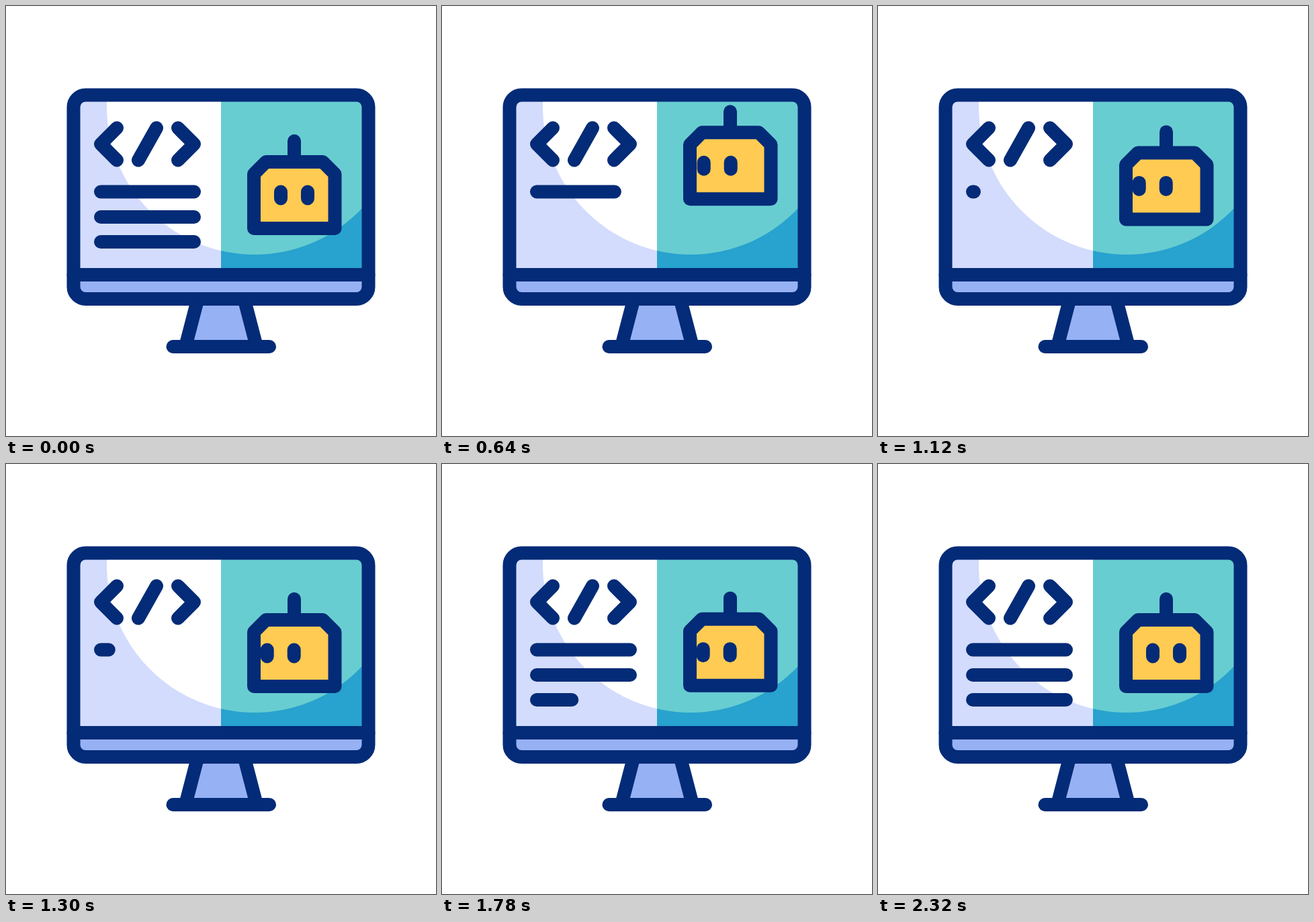
Write an HTML page that moves like this. It is 640 px wide and 640 px high and loops after 2.4 s.

```html
<!DOCTYPE html>
<html lang="en">
<head>
<meta charset="utf-8">
<title>Coding robot</title>
<style>
  html, body { margin: 0; width: 100%; height: 100%; overflow: hidden; background: #fff; }
  svg { display: block; width: 100%; height: 100%; }
  .ink { fill: none; stroke: #032b77; stroke-width: 20; stroke-linecap: round; stroke-linejoin: round; }
</style>
</head>
<body>
<svg viewBox="0 0 640 640">
  <clipPath id="disc"><circle cx="370" cy="150" r="220"/></clipPath>

  <path class="ink" style="fill:#96b1f4" d="M285.5 436 267 507H373L354.5 436"/>
  <path class="ink" d="M248.5 507H392"/>

  <path fill="#d3dcfd" d="M100 132H320V400H100z"/>
  <path fill="#28a2ce" d="M320 132H540V400H320z"/>
  <g clip-path="url(#disc)">
    <path fill="#fff" d="M100 132H320V400H100z"/>
    <path fill="#68cdd1" d="M320 132H540V400H320z"/>
  </g>
  <path fill="#96b1f4" d="M100 400H540V418a18 18 0 0 1-18 18H118a18 18 0 0 1-18-18z"/>
  <rect class="ink" x="100.5" y="132.5" width="439" height="303.5" rx="18"/>
  <path class="ink" d="M100.5 400H539.5"/>

  <path class="ink" d="M165 181.5 141 205.5 165 229.5M224 181.5 197 229.5M256 181.5 280 205.5 256 229.5"/>
  <g id="lines" class="ink"><path/><path/><path/></g>

  <g id="robot" class="ink">
    <path d="M429 201V232"/>
    <path fill="#ffcb52" d="M369 331V250L387 232H471.5L489.5 250V331z"/>
    <path id="eyes" d="M409 276.5V286.5M449 276.5V286.5"/>
  </g>
</svg>
<script>
const LOOP = 2400, LEFT = 141, LENGTH = 139;
const lineY = [276.5, 314, 351];
const [robot, eyes] = ['robot', 'eyes'].map(id => document.getElementById(id));
const lines = [...document.querySelectorAll('#lines path')];

const clamp = x => Math.min(1, Math.max(0, x));
const span = (t, from, to) => clamp((t - from) / (to - from));
const smooth = u => u * u * (3 - 2 * u);

// cubic-bezier(1/3, 0, x2, 1)
function settle(u, x2 = 0.15) {
  let lo = 0, hi = 1;
  for (let i = 0; i < 24; i++) {
    const s = (lo + hi) / 2, r = 1 - s;
    if (r * r * s + 3 * r * s * s * x2 + s ** 3 < u) lo = s; else hi = s;
  }
  return smooth((lo + hi) / 2);
}

function draw(t) {
  // The three lines share one stroke reveal: erased from the end, then typed again.
  const erased = settle(span(t, 218, 1217));
  const typed = settle(span(t, 1200, 2344), 0.215);
  const shown = Math.max(1 - erased, typed) * lines.length;
  lines.forEach((line, i) => {
    const part = clamp(shown - i);
    line.setAttribute('d', part > 0 ? `M${LEFT} ${lineY[i]}h${part * LENGTH}` : '');
  });

  const hop = (up, top, fall, down) => smooth(span(t, up, top)) - smooth(span(t, fall, down));
  const height = 43.7 * hop(60, 580, 800, 1310) + 21 * hop(1310, 1565, 1565, 1820);
  robot.setAttribute('transform', `translate(0 ${-height})`);

  const glance = settle(span(t, 330, 770)) - settle(span(t, 1880, 2320));
  eyes.setAttribute('transform', `translate(${-20.3 * glance} 0)`);
}

function tick() {
  draw(performance.now() % LOOP);
  requestAnimationFrame(tick);
}
tick();
</script>
</body>
</html>
```
